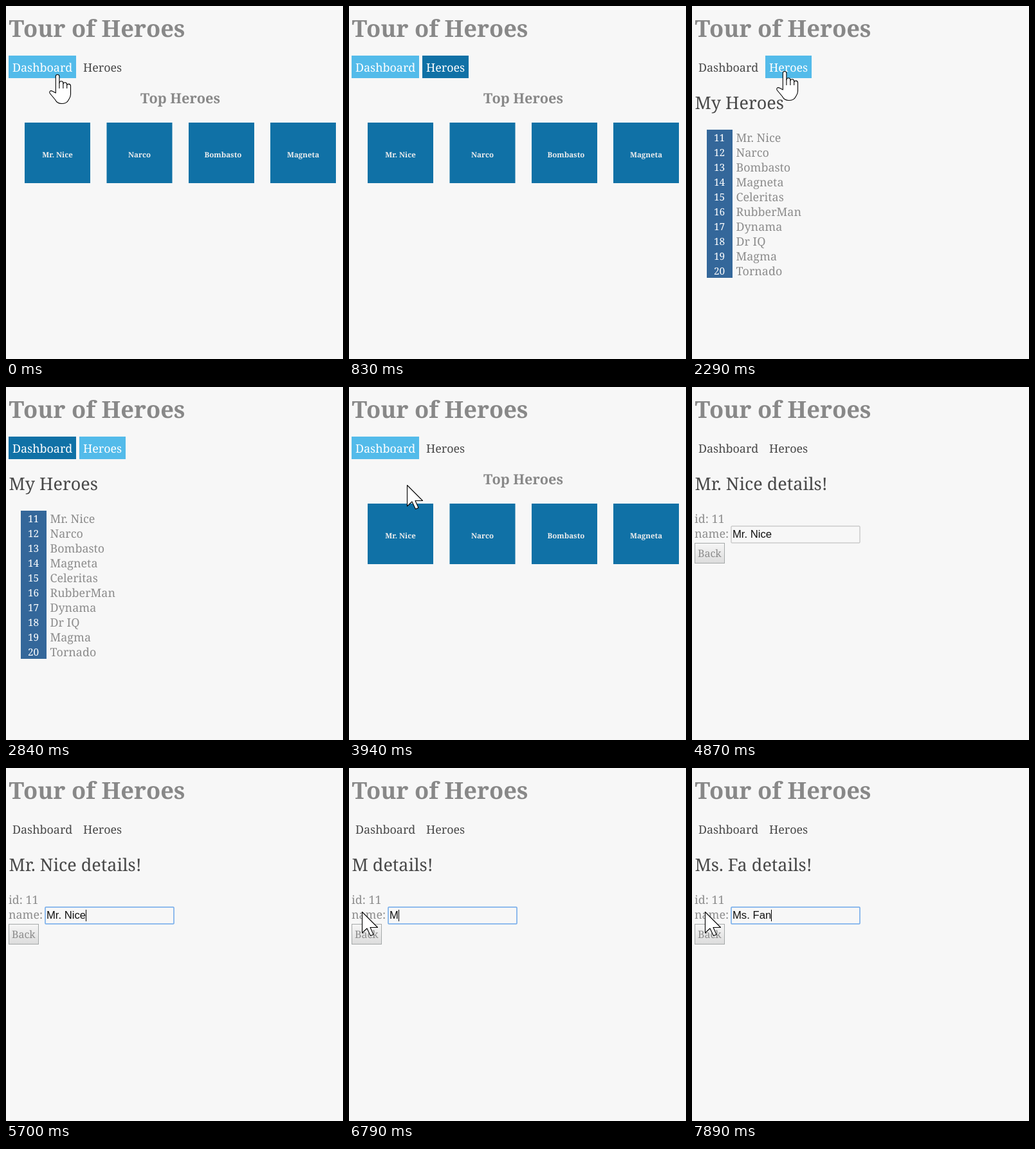
Animation of 524 by 548 pixels, one loop 8000 ms. Source, as an HTML page:

```html
<!DOCTYPE html>
<html lang="en">
<head>
<meta charset="utf-8">
<title>Tour of Heroes</title>
<style>
  html, body { margin: 0; width: 100%; height: 100%; overflow: hidden; background: #f7f7f7; }
  svg { display: block; width: 524px; height: 548px; font-family: "Noto Serif", serif; text-rendering: geometricPrecision; }
  .title { font-size: 36.3px; font-weight: 700; fill: #888; }
  .sub { font-size: 21.7px; font-weight: 700; fill: #888; text-anchor: middle; }
  .head { font-size: 27px; fill: #484848; }
  .body { font-size: 17.9px; fill: #8c8c8c; }
  .link { font-size: 17.9px; }
  .tile { font-size: 11.5px; font-weight: 700; fill: #eee; text-anchor: middle; }
  .badge { font-size: 15.4px; fill: #fff; text-anchor: middle; }
  .field { font: 16.67px "Liberation Sans", Arial, sans-serif; fill: #111; white-space: pre; text-rendering: auto; }
  .button { font-size: 16px; fill: #8c8c8c; }
  .cursor { stroke: #000; stroke-width: 1.1; stroke-linejoin: round; fill: #fff; }
</style>
</head>
<body>
<svg id="stage" viewBox="0 0 524 548">
  <defs>
    <linearGradient id="face" x2="0" y2="1">
      <stop offset="0" stop-color="#f6f6f6"/>
      <stop offset="1" stop-color="#dcdcdc"/>
    </linearGradient>
  </defs>
  <rect width="524" height="548" fill="#f7f7f7"/>
  <text class="title" x="4.5" y="47.5">Tour of Heroes</text>
  <g id="nav"></g>
  <g id="dashboard"><text class="sub" x="271" y="151">Top Heroes</text></g>
  <g id="heroes">
    <text class="head" x="4.5" y="160">My Heroes</text>
    <rect x="23" y="192" width="40" height="230" fill="#34679a"/>
  </g>
  <g id="detail">
    <text id="heading" class="head" x="4.5" y="160"></text>
    <text class="body" x="4" y="211">id: 11</text>
    <text class="body" x="4" y="234">name:</text>
    <rect id="box" x="61" y="216" width="200" height="26" rx="1" fill="#f7f7f7"/>
    <text id="field" class="field" x="63" y="234"></text>
    <rect id="caret" y="220" width="1" height="18" fill="#000"/>
    <rect x="4.5" y="242.5" width="46" height="31" fill="url(#face)" stroke="#a5a9a9"/>
    <text class="button" x="9" y="264">Back</text>
  </g>
  <g id="pointer" class="cursor">
    <path id="arrow" d="M.5 .5V33L8 26L13.5 37.5L18 35.5L13 24.5H24.5Z"/>
    <g id="hand" transform="translate(-13 0)">
      <path d="M10.3 29V3.3a2.8 2.8 0 0 1 5.6 0V13.5c.2-3.6 5.8-3.6 6 0V15c.3-3 5.6-3 5.8.6V17c.3-2.8 5.6-2.6 5.8 1V31c0 5-2.5 7-4 10-1.5 3-4 4.5-10 4.5-5 0-8-2-10-6L1.2 29.5c-1.5-3 1-5 4-3.2Z"/>
      <path fill="none" d="M15.9 13V22M21.9 14.5V22M27.7 16.5V22"/>
    </g>
    <path id="beam" fill="none" d="M-3.5-14.5H-1.5L0-13L1.5-14.5H3.5M0-13V13M-3.5 14.5H-1.5L0 13L1.5 14.5H3.5"/>
  </g>
</svg>
<script>
const LOOP = 8000, STEP = 60;
const ACTIVE = '#53bbea', DARK = '#1071a6';
const $ = id => document.getElementById(id);

function add(parent, tag, attrs, text = '') {
  const el = document.createElementNS('http://www.w3.org/2000/svg', tag);
  for (const key in attrs) el.setAttribute(key, attrs[key]);
  el.textContent = text;
  return parent.appendChild(el);
}
const show = (el, on) => el.setAttribute('display', on ? 'inline' : 'none');

const links = [['Dashboard', 4, 105], ['Heroes', 114, 72]].map(([name, x, w]) => ({
  x, w, page: name.toLowerCase(),
  rect: add($('nav'), 'rect', { x, y: 77, width: w, height: 35 }),
  label: add($('nav'), 'text', { class: 'link', x: x + 6, y: 102 }, name)
}));

const names = ['Mr. Nice', 'Narco', 'Bombasto', 'Magneta', 'Celeritas',
  'RubberMan', 'Dynama', 'Dr IQ', 'Magma', 'Tornado'];
const tileX = [29, 156.5, 284, 411];
const labelX = [80, 207.5, 337.5, 462];
const tiles = tileX.map((x, i) => {
  const rect = add($('dashboard'), 'rect', { x, y: 181, width: 102, height: 94, fill: DARK });
  add($('dashboard'), 'text', { class: 'tile', x: labelX[i], y: 235 }, names[i]);
  return rect;
});
names.forEach((name, i) => {
  const y = 211 + 23 * i;
  add($('heroes'), 'text', { class: 'badge', x: 42.5, y: y - 1.5 }, 11 + i);
  add($('heroes'), 'text', { class: 'body', x: 68.5, y }, name);
});

// Each trip: time hidden again, then points of [time, x, y].
const trips = [
  { end: 830, path: [[200, 80, 106], [500, 143, 103]] },
  { end: 2840, path: [[2290, 144, 101], [2710, 91, 101]] },
  { end: 4610, path: [[3700, 92, 101], [3940, 90, 152], [4480, 84, 224]] },
  { end: 5500, path: [[5200, 87, 224], [5440, 150, 234]] },
  { end: LOOP, path: [[5760, 138, 233], [6000, 26, 223.5], [6129, 26, 223.5], [6130, 20, 223]] }
];

function along(path, t) {
  if (t <= path[0][0]) return path[0].slice(1);
  for (let i = 1; i < path.length; i++) {
    const [t0, x0, y0] = path[i - 1], [t1, x1, y1] = path[i];
    if (t < t1) {
      const k = (t - t0) / (t1 - t0);
      return [x0 + (x1 - x0) * k, y0 + (y1 - y0) * k];
    }
  }
  return path[path.length - 1].slice(1);
}

// Position of the mouse, which stays put while its pointer is hidden.
function mouse(t) {
  const trip = trips.filter((m, i) => i === 0 || t >= m.path[0][0]).pop();
  const start = trip.path[0][0], last = trip.path[trip.path.length - 1];
  const at = t >= last[0] ? last[0] : start + Math.floor((t - start) / STEP) * STEP;
  const [x, y] = along(trip.path, at);
  return { x, y, visible: t < trip.end };
}

const at = (list, t) => list.filter(([time]) => t >= time).pop()[1];
const pages = [[0, 'dashboard'], [1030, 'heroes'], [3100, 'dashboard'], [4870, 'detail']];
const typed = [[0, 'Mr. Nice'], [6730, 'M'], [7120, 'Ms'], [7300, 'Ms.'],
  [7430, 'Ms. '], [7630, 'Ms. F'], [7830, 'Ms. Fa'], [7890, 'Ms. Fan']];
const shown = [[0, 'Mr. Nice'], [6790, 'M'], [7180, 'Ms'], [7360, 'Ms.'],
  [7630, 'Ms. F'], [7830, 'Ms. Fa']];

const inside = (p, x, y, w, h) => p.x >= x && p.x < x + w && p.y >= y && p.y < y + h;

function render(t) {
  const page = at(pages, t), p = mouse(t);
  for (const id of ['dashboard', 'heroes', 'detail']) show($(id), id === page);

  let kind = 'arrow';
  for (const link of links) {
    const active = link.page === page, over = inside(p, link.x, 77, link.w, 35);
    if (over) kind = 'hand';
    show(link.rect, active || over);
    link.rect.setAttribute('fill', active ? ACTIVE : DARK);
    link.label.setAttribute('fill', active || over ? '#fff' : '#484848');
  }
  tiles.forEach((tile, i) => {
    const over = page === 'dashboard' && inside(p, tileX[i], 181, 102, 94);
    if (over) kind = 'hand';
    tile.setAttribute('fill', over ? ACTIVE : DARK);
  });

  if (page === 'detail') {
    const focus = t >= 5700;
    $('heading').textContent = at(shown, t) + ' details!';
    $('field').textContent = at(typed, t);
    $('box').setAttribute('stroke', focus ? '#6ea8ea' : '#b5b5b5');
    $('box').setAttribute('stroke-width', focus ? 1.5 : 1);
    show($('caret'), focus);
    $('caret').setAttribute('x', Math.round(63 + $('field').getComputedTextLength()));
    if (inside(p, 61, 216, 200, 26)) kind = 'beam';
  }

  show($('pointer'), p.visible);
  $('pointer').setAttribute('transform', `translate(${Math.round(p.x)} ${Math.round(p.y)})`);
  for (const id of ['arrow', 'hand', 'beam']) show($(id), id === kind);
}

const begin = performance.now();
function tick() {
  render((performance.now() - begin) % LOOP);
  requestAnimationFrame(tick);
}
tick();
</script>
</body>
</html>
```
